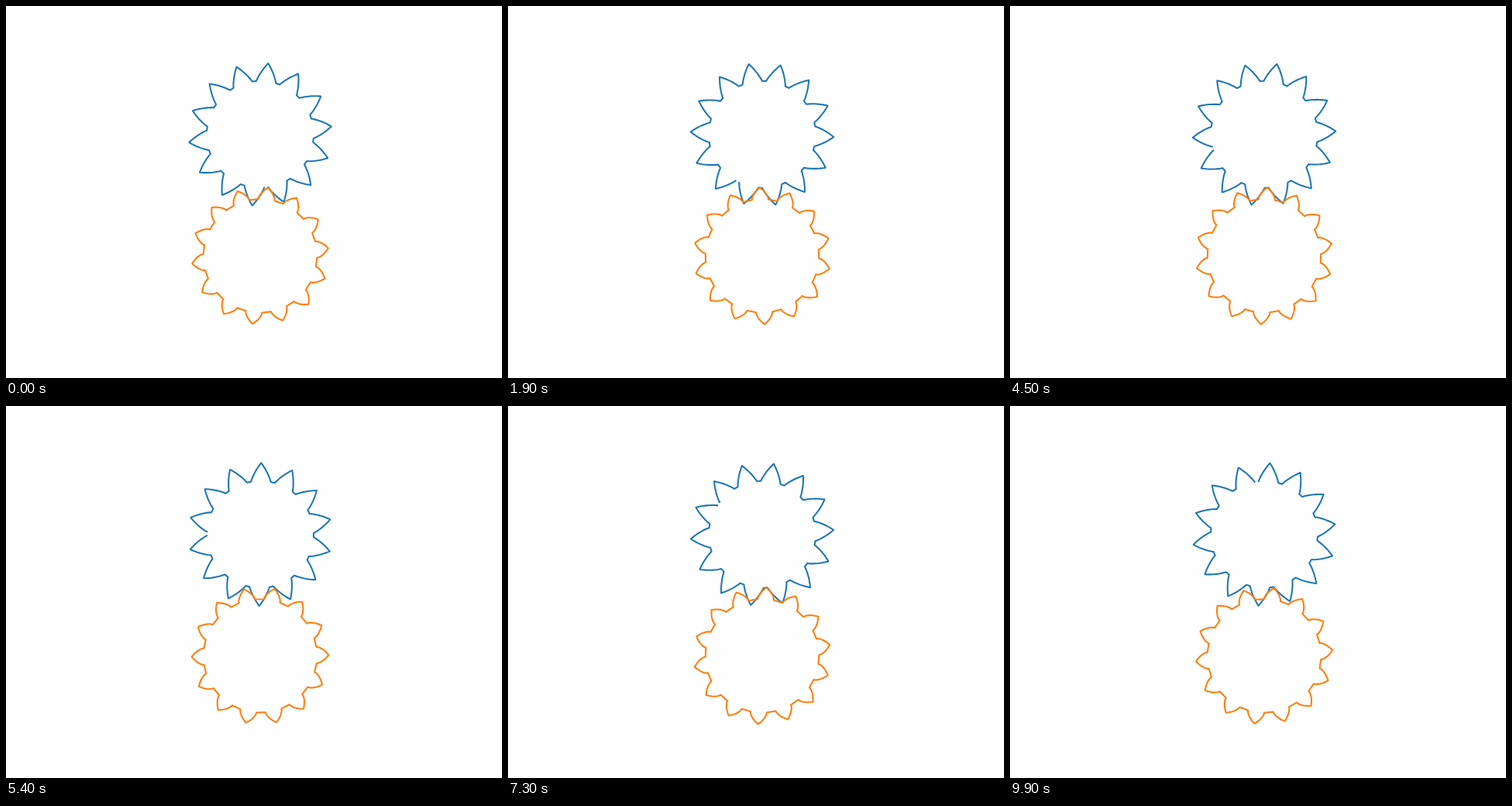
These frames come from a looping animation (640 by 480 pixels, 10 s). An HTML page with a canvas:

```html
<!DOCTYPE html>
<html lang="en">
<head>
<meta charset="utf-8">
<title>Meshing gears</title>
<style>
  html, body { margin: 0; width: 100%; height: 100%; overflow: hidden; background: #fefefe; }
  canvas { display: block; }
</style>
</head>
<body>
<canvas id="stage" width="640" height="480"></canvas>
<script>
const ctx = document.getElementById('stage').getContext('2d');
const LOOP = 10000, STEP = 100;
const TEETH = 14, PITCH = 2 * Math.PI / TEETH;
const SAMPLES = 12;

// half: half angle of a tooth at its root; bulge: 1 gives straight flanks, more rounds them
const upper = {
  x: 328, y: 165.7, color: '#1f77b4', dir: 1, start: Math.PI / 2 - PITCH / 4, closed: false,
  root: 69, tip: 92.3, half: 0.187, bulge: 1.03
};
const lower = {
  x: 328, y: 322.4, color: '#ff7f0e', dir: -1, start: -Math.PI / 2 - PITCH / 4, closed: true,
  root: 73.3, tip: 88.3, half: 0.145, bulge: 1.5
};

function drawGear(gear, turn) {
  ctx.beginPath();
  for (let k = 0; k < TEETH; k++) {
    const mid = gear.start + gear.dir * turn + (k + 0.5) * PITCH;
    for (let i = -SAMPLES; i <= SAMPLES; i++) {
      const rise = 1 - Math.abs(i) / SAMPLES;
      const r = gear.root + (gear.tip - gear.root) * rise;
      const a = mid + Math.sign(i) * gear.half * (1 - rise ** gear.bulge);
      ctx.lineTo(gear.x + r * Math.cos(a), gear.y + r * Math.sin(a));
    }
  }
  if (gear.closed) ctx.closePath();
  ctx.strokeStyle = gear.color;
  ctx.stroke();
}

function draw(now) {
  const step = Math.floor((now % LOOP) / STEP);
  const turn = Math.PI * step * STEP / LOOP;
  ctx.fillStyle = '#fefefe';
  ctx.fillRect(0, 0, 640, 480);
  ctx.lineWidth = 2.08;
  ctx.lineJoin = 'round';
  ctx.lineCap = 'square';
  drawGear(upper, turn);
  drawGear(lower, turn);
}

const begin = performance.now();
function tick() {
  draw(performance.now() - begin);
  requestAnimationFrame(tick);
}
tick();
</script>
</body>
</html>
```
